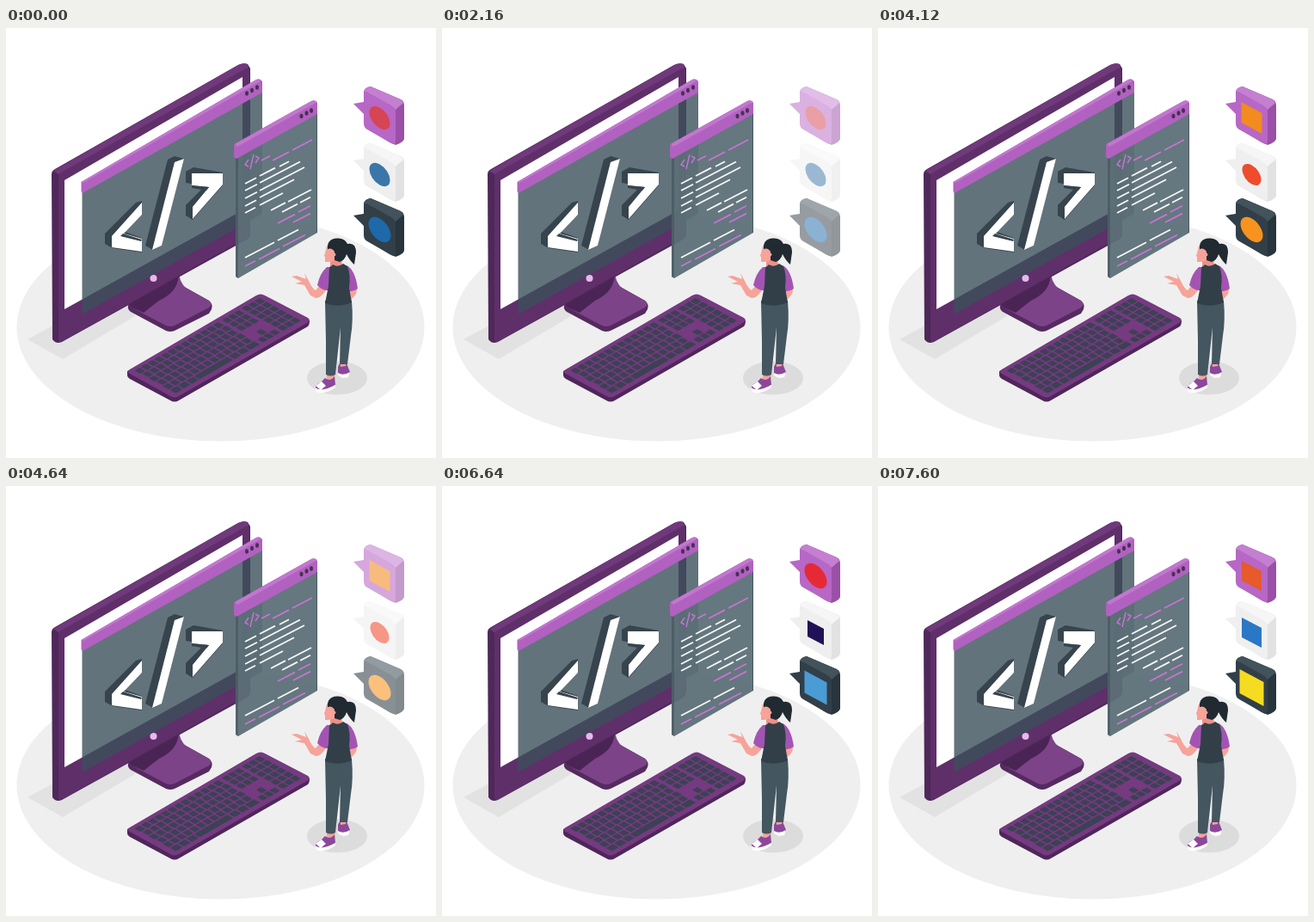
An HTML page for the animation above (8 s loop, 500 by 500 pixels).

```html
<!DOCTYPE html>
<html lang="en">
<head>
<meta charset="utf-8">
<title>Coding languages</title>
<style>
  html, body { margin: 0; width: 100%; height: 100%; overflow: hidden; background: #fff; }
  svg { display: block; width: 100%; height: 100%; }
</style>
</head>
<body>
<svg viewBox="0 0 500 500">
  <ellipse cx="249.5" cy="348" rx="237" ry="132.5" fill="#efefef"/>
  <path d="M25 362 60 343 146 320 150 335 66 385Z" fill="#e2e2e2"/>
  <ellipse cx="385" cy="407" rx="35" ry="19.5" fill="#dcdcdc"/>

  <g id="monitor">
    <path d="M142 323Q143 319 149 316L178 300 200 288 204 299 236 317Q241 321 239 327L236 332 196 352Q191 354 186 352L145 330Q141 327 142 323Z" fill="#552a60"/>
    <path d="M144 320 178 301 203 299 236 317Q241 321 236 325L196 346Q191 348 186 346L146 325Q142 322 144 320Z" fill="#7d4388"/>
    <path d="M144 320 201 287Q200 307 178 317L160 331 146 325Q142 322 144 320Z" fill="#4b2456"/>
    <path d="M201 287Q204 301 216 308L178 325 166 329Q199 313 201 287Z" fill="#7d4388"/>
    <path d="M53 170Q53 166 57 164L270 43Q276 40 281 42L284 47V239Q284 243 280 246L65 365Q58 368 54 362Z" fill="#4f285a"/>
    <path d="M55 166 270 43Q276 40 281 42L282 46 62 171Z" fill="#70397b"/>
    <path d="M61 172Q61 170 64 168L277 48Q282 45 283 49V238Q283 242 279 244L66 364Q61 367 61 361Z" fill="#5f2f6a"/>
    <path d="M68 177 275 57V212L68 327Z" fill="#fff"/>
    <circle cx="171.500" cy="291" r="4" fill="#e6b9ec"/>
  </g>

  <g id="bigWindow">
    <path d="M88.500 190 298 72V216L90 332 88.500 331Z" fill="#3b505b" opacity=".8"/>
    <path d="M87.500 179 291 60Q295 58 298 62V75L89 192 87.500 190Z" fill="#b161c0"/>
    <path d="M87.500 179 291 60 297 61 90 180Z" fill="#c078cc"/>
    <g fill="#493052">
      <ellipse cx="280" cy="76" rx="2" ry="2.800"/><ellipse cx="286" cy="72.500" rx="2" ry="2.800"/><ellipse cx="292" cy="69" rx="2" ry="2.800"/>
    </g>
    <g fill="#37444d">
      <path d="M151 203 158 201V217L138 237 158 244V261L124 256 115 251V239Z"/>
      <path d="M188 153 196 149 207 152 181 253 171 258 162 253Z"/>
      <path d="M209 167 218 162 252 168V183L217 223 209 218V206L231 184 209 180Z"/>
    </g>
    <g fill="#fff">
      <path d="M158 203V217L137 239 158 245V260L123 255V242Z"/>
      <path d="M196 156 207 152 181 253 170 258Z"/>
      <path d="M216 169 252 169V182L217 222V208L236 185 216 183Z"/>
    </g>
    <path d="M136 239 158 246 157 248 133 242ZM216 183 236 185 233 189 216 186Z" fill="#37444d"/>
  </g>

  <g id="smallWindow">
    <path d="M267 151 362 99V238L270 291 267 289Z" fill="#5c6f78" opacity=".94"/>
    <path d="M267 151V289L270 291V150Z" fill="#44545e" opacity=".6"/>
    <path d="M265 137Q265 135 267 134L355 85Q359 83 362 87V100L268 152 265 150Z" fill="#b161c0"/>
    <path d="M266 135 355 85Q359 83 362 86L269 138Z" fill="#c078cc"/>
    <path d="M361.500 100V238" stroke="#4a5a64"/>
    <g fill="#493052">
      <ellipse cx="343.500" cy="102.500" rx="2" ry="2.800"/><ellipse cx="349.500" cy="99" rx="2" ry="2.800"/><ellipse cx="355" cy="96" rx="2" ry="2.800"/>
    </g>
    <path d="M282 153 278 159 282 161M288 147 284 164M290 149 294 151 290 157" fill="none" stroke="#c774d4" stroke-width="1.400"/>
    <g id="codeLines" stroke-width="1.800"></g>
  </g>

  <g id="keyboard">
    <path d="M141 399V404Q141 406 144 408L191 433Q196 436 201 433L351 347Q353 345 353 340L296 312Z" fill="#4f265a"/>
    <path d="M144 397 291 311Q296 308 301 311L351 337Q355 340 350 343L201 428Q196 431 191 428L144 402Q139 400 144 397Z" fill="#753a80"/>
    <g id="keys" transform="matrix(1.55 -.9 .55 .3 141 399)" fill="#3c4154"></g>
  </g>

  <g id="woman">
    <path d="M386 394 388 390 396 390 400 400Q399 404 394 405L386 402Z" fill="#8c479a"/>
    <path d="M386 401Q392 405 400 400L398 406 392 407 386 404Z" fill="#fff"/>
    <path d="M388 384H396L395 393 389 394ZM373 398H383L382 410 373 410Z" fill="#f6a39a"/>
    <path d="M371 407Q377 412 382 405L383 415 372 421Q364 424 360 419 359 415 366 412Z" fill="#8c479a"/>
    <path d="M360 416 367 411 372 416 366 421ZM359 418Q367 424 383 415V418Q370 427 361 423Z" fill="#fff"/>
    <path d="M371 317H402Q404 341 401 358L397 391H388L389 348 383 403Q378 406 372 403L372 364Z" fill="#44565f"/>
    <path d="M365 299 374 302Q366 315 360 314L354 311 347 299 336 297 344 295 332 289 338 288 349 292 347 285 352 294Q356 303 360 305Z" fill="#f6a39a"/>
    <path d="M400 302 408 301Q409 308 404 313L398 319Z" fill="#f6a39a"/>
    <path d="M373 278Q365 285 362 299 368 306 376 305L380 278ZM396 276Q406 281 409 303 404 307 398 306Z" fill="#a354b3"/>
    <path d="M377 268 390 266 391 278Q383 281 377 278Z" fill="#ee9088"/>
    <path d="M376 278Q379 277 380 275 386 279 392 274L397 277Q401 287 399 302L402 319Q386 326 371 320L375 300Z" fill="#323f48"/>
    <path d="M373 253 371 262Q369 265 371 266L371 272 375 272 383 270 387 258Z" fill="#f6a39a"/>
    <path d="M374 257Q373 245 385 244.500 394 244 397 251 407 249 407 261L405 275Q400 271 396 263 394 270 388 272L382 270 382 260Q379 255 374 257Z" fill="#222a31"/>
    <circle cx="381.500" cy="263.500" r="1.900" fill="#f6a39a"/>
  </g>

  <g id="bubbles"></g>
</svg>
<script>
const $ = id => document.getElementById(id);
const PINK = '#c774d4', WHITE = '#f8f8f8';

// x, y, horizontal length, colour
$('codeLines').innerHTML = [
  [297, 154, 10, PINK], [310, 154, 19, PINK], [333, 142, 23, PINK],
  [278, 181, 13, WHITE], [295, 172, 18, WHITE], [318, 161, 11, WHITE],
  [278, 189, 14, WHITE], [295, 180, 47, WHITE],
  [278, 198, 14, WHITE], [295, 189, 52, WHITE],
  [278, 207, 13, WHITE], [295, 197, 40, WHITE],
  [278, 215, 12, WHITE], [295, 206, 27, WHITE],
  [308, 212, 17, WHITE], [328, 202, 27, WHITE],
  [321, 214, 18, WHITE], [342, 203, 12, WHITE],
  [316, 227, 20, PINK], [340, 214, 14, PINK], [334, 226, 20, PINK],
  [278, 267, 34, WHITE], [316, 247, 24, WHITE],
  [278, 277, 12, PINK], [294, 269, 24, PINK], [322, 254, 26, PINK]
].map(([x, y, w, color]) => `<path d="M${x} ${y}l${w} ${-w * .52}" stroke="${color}"/>`).join('');

const key = (x, y, w = 3.8) => `<rect x="${x}" y="${y}" width="${w}" height="12.300" rx=".6"/>`;
let keys = '';
for (let row = 0; row < 6; row++) {
  const y = 7 + row * 15;
  if (row < 5) {
    for (let col = 0; col < 13; col++) keys += key(3 + col * 4.9 + (row % 2) * .6, y);
  } else {
    for (const [x, w] of [[3, 5], [9, 5], [15, 5], [21, 25], [47, 5], [53, 5], [59, 7]]) keys += key(x, y, w);
  }
  for (let col = 0; col < 3; col++) {
    if (row < 3 || row === 5 || (row === 4 && col === 1)) keys += key(68.5 + col * 4.5, y, 3.6);
  }
  for (let col = 0; col < 3; col++) keys += key(83.5 + col * 4.7, y);
}
$('keys').innerHTML = keys;

const tiles = [
  { y: 0, front: '#b767c5', top: '#c57fd1', side: '#9a50a6' },
  { y: 66, front: '#efefef', top: '#f6f6f6', side: '#e2e2e2' },
  { y: 130, front: '#323f48', top: '#43535c', side: '#29353d' }
];
const circle = (color, r) => `<circle r="${r}" fill="${color}"/>`;
const square = (color, s) => `<rect x="${-s / 2}" y="${-s / 2}" width="${s}" height="${s}" fill="${color}"/>`;
const badges = [
  [circle('#d64553', 12), circle('#3b76a8', 12), circle('#1d69aa', 13)],
  [square('#f28b20', 24), circle('#ee4c2c', 11), circle('#f7931e', 13)],
  [circle('#e62a35', 13), square('#211257', 19), square('#4b9bd5', 26)],
  [square('#e65a2b', 23), square('#2a77c5', 23), square('#f5dc20', 28)]
];

const bubble = ({ y, front, top, side }, badge) => `
  <g transform="translate(0 ${y})">
    <path d="M416 74Q417 69 424 68L459 83Q463 85 463 90V129Q462 133 453 136L446 133 419 116Z" fill="${side}"/>
    <path d="M416 74Q418 69 424 68L459 83 462 87 453 95Z" fill="${top}"/>
    <path d="M416 77Q416 72 421 75L448 90Q453 93 453 98V131Q453 137 448 134L420 118Q416 116 416 111V100L404 88 416 86Z" fill="${front}"/>
    <g transform="translate(434.500 104.500) skewY(28)">${badge}</g>
  </g>`;

const LOOP = 8000, PERIOD = 2520, LEAD = 80;
const FADE_START = 1600, FADE_LENGTH = 800;
const bubbles = $('bubbles');
let shown = -1;

function draw(now) {
  const shifted = now % LOOP + LEAD;
  const set = Math.floor(shifted / PERIOD);
  if (set !== shown) {
    bubbles.innerHTML = tiles.map((tile, i) => bubble(tile, badges[set][i])).join('');
    shown = set;
  }
  const local = shifted % PERIOD - LEAD;
  const progress = Math.min(1, Math.max(0, (local - FADE_START) / FADE_LENGTH));
  bubbles.setAttribute('opacity', 1 - progress ** 2);
  requestAnimationFrame(draw);
}
draw(performance.now());
</script>
</body>
</html>
```
